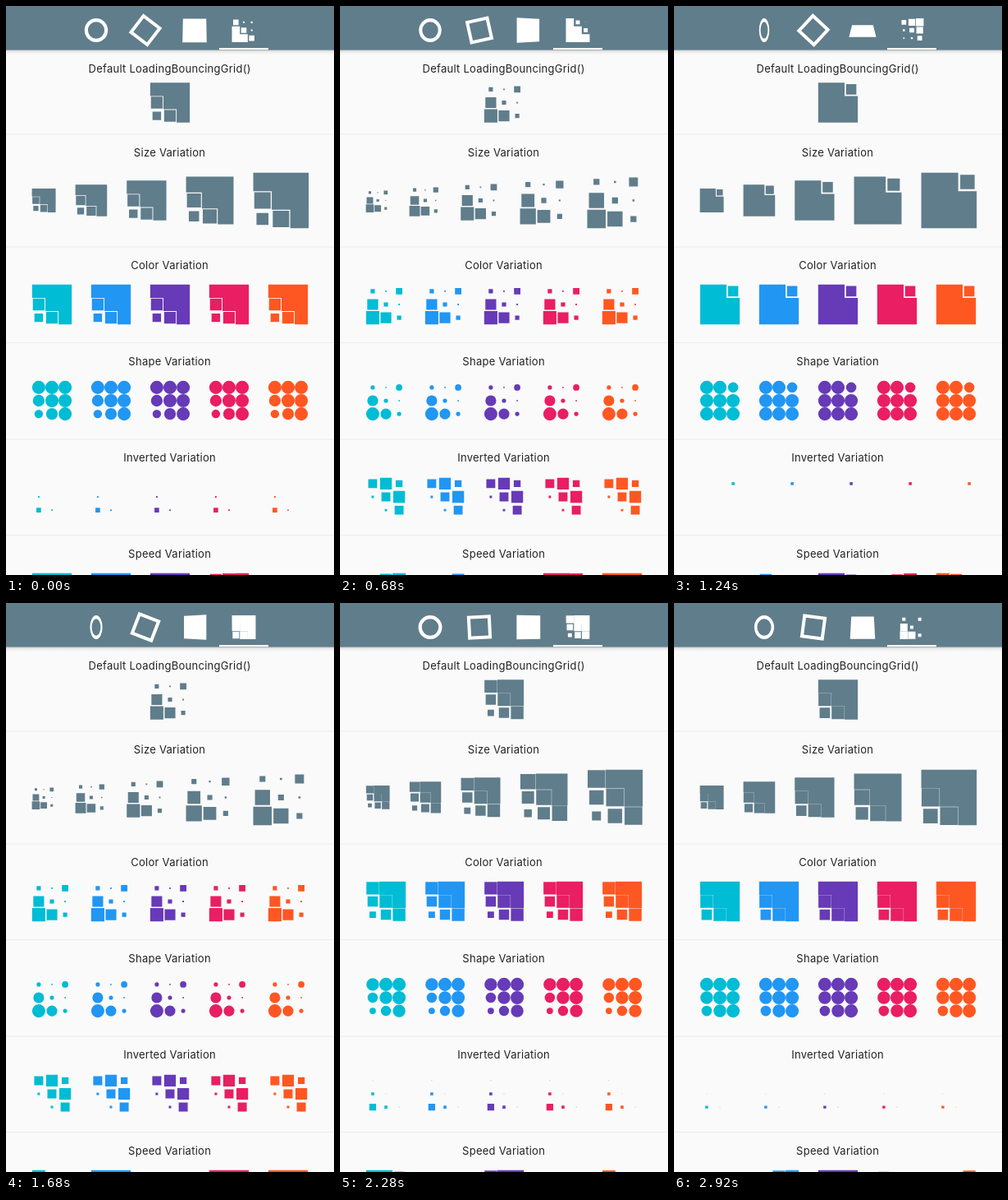
Write an HTML page that moves like this. It is 400x692 px and loops after 2960 ms.

```html
<!DOCTYPE html>
<html lang="en">
<head>
<meta charset="utf-8">
<title>Loading grids</title>
<style>
  html, body { margin: 0; width: 100%; height: 100%; overflow: hidden; background: #fafafa; }
  svg { display: block; width: 400px; height: 692px; }
  text { font: 13px Inter, Roboto, sans-serif; letter-spacing: .27px; fill: #222; text-anchor: middle; }
</style>
</head>
<body>
<svg id="stage" viewBox="0 0 400 692" xmlns="http://www.w3.org/2000/svg">
  <defs>
    <linearGradient id="shade" x1="0" y1="0" x2="0" y2="1">
      <stop offset="0" stop-color="#000" stop-opacity=".22"/>
      <stop offset=".4" stop-color="#000" stop-opacity=".07"/>
      <stop offset="1" stop-color="#000" stop-opacity="0"/>
    </linearGradient>
  </defs>
  <rect width="400" height="692" fill="#fafafa"/>
  <rect y="53" width="400" height="6" fill="url(#shade)"/>
  <rect width="400" height="53.5" fill="#607d8b"/>
  <rect x="260" y="51" width="60" height="2.2" fill="#fff"/>
  <circle id="ring" r="12.4" fill="none" stroke="#fff" stroke-width="4.2"/>
  <rect id="frame" x="-12.5" y="-12.5" width="25" height="25" fill="none" stroke="#fff" stroke-width="4"/>
  <polygon id="plate" fill="#fff"/>
</svg>
<script>
const LOOP = 2960, BEAT = 1500, UNIT = 400 / 414, ICON_Y = 29.5;
const GREY = '#607d8b';
const COLORS = ['#00bcd4', '#2196f3', '#673ab7', '#e91e63', '#ff5722'];
const stage = document.getElementById('stage');
const [ring, frame, plate] = ['ring', 'frame', 'plate'].map(id => document.getElementById(id));

function add(tag, attrs, content = '') {
  const node = document.createElementNS('http://www.w3.org/2000/svg', tag);
  for (const key in attrs) node.setAttribute(key, attrs[key]);
  node.textContent = content;
  return stage.appendChild(node);
}

function bezier(x1, y1, x2, y2) {
  const at = (a, b, s) => 3 * a * s * (1 - s) ** 2 + 3 * b * s * s * (1 - s) + s ** 3;
  return x => {
    if (x <= 0) return 0;
    if (x >= 1) return 1;
    let lo = 0, hi = 1;
    for (let i = 0; i < 22; i++) {
      const mid = (lo + hi) / 2;
      if (at(x1, x2, mid) < x) lo = mid; else hi = mid;
    }
    return at(y1, y2, lo);
  };
}
const easeIn = bezier(.42, 0, 1, 1);
const easeOut = bezier(0, 0, .58, 1);
const easeInOut = bezier(.42, 0, .58, 1);

const grids = [];
function addGrid(x, y, size, fill, options = {}) {
  const defaults = { start: 320, beat: BEAT, round: false, inverted: false };
  grids.push({ x, y, size, node: add('path', { fill }), ...defaults, ...options });
}

function addTitle(text, y) {
  add('text', { x: 199.6, y }, text);
}

function addDivider(y) {
  add('rect', { x: 0, y: y - .5, width: 400, height: 1, fill: '#eee' });
}

function addColorRow(title, y, optionsFor = () => ({})) {
  addTitle(title, y - 43.4);
  COLORS.forEach((color, i) => addGrid(56 + 72 * i, y, 50 * UNIT, color, optionsFor(i)));
}

addGrid(290, ICON_Y, 30 * UNIT, '#fff', { start: 1110 });
addTitle('Default LoadingBouncingGrid()', 81.3);
addGrid(200, 117.5, 50 * UNIT, GREY);
addTitle('Size Variation', 183.3);
let left = 31.6;
for (const size of [30, 40, 50, 60, 70]) {
  addGrid(left + size * UNIT / 2, 236.5, size * UNIT, GREY);
  left += size * UNIT + 24;
}
addColorRow('Color Variation', 363);
addColorRow('Shape Variation', 480, () => ({ round: true }));
addColorRow('Inverted Variation', 597, () => ({ inverted: true }));
addColorRow('Speed Variation', 714, i => ({ beat: 2500 - 500 * i }));
[156, 293, 409.5, 527, 643.5].forEach(addDivider);

// Goes 0 → 1 → 0, each diagonal starting a tenth of a beat after the last.
function shrinkage(progress, diagonal) {
  const x = easeIn((progress - diagonal * .1) / .6);
  return 1 - Math.abs(1 - 2 * x);
}

function cellPath(x, y, half, round) {
  const side = half * 2;
  return round
    ? `M${x - half} ${y}a${half} ${half} 0 1 1 ${side} 0a${half} ${half} 0 1 1 ${-side} 0z`
    : `M${x - half} ${y - half}h${side}v${side}h${-side}z`;
}

function drawGrid(grid, t) {
  const phase = (t + grid.start) / grid.beat % 2;
  const progress = phase > 1 ? 2 - phase : phase;
  const cell = grid.size / 3;
  let d = '';
  for (let row = -1; row <= 1; row++) {
    for (let col = -1; col <= 1; col++) {
      const shrunk = shrinkage(progress, col - row + 2);
      const scale = grid.inverted ? shrunk : 1 - shrunk;
      if (scale > .01) {
        d += cellPath(grid.x + col * cell, grid.y + row * cell, cell * scale / 2, grid.round);
      }
    }
  }
  grid.node.setAttribute('d', d);
}

// Square turned about the x axis, then the y axis, in perspective.
function platePoints(turnX, turnY) {
  const half = 15 * UNIT;
  return [[-1, -1], [1, -1], [1, 1], [-1, 1]].map(([sx, sy]) => {
    const depth = half * (sy * Math.sin(turnX) - sx * Math.sin(turnY));
    const w = 1 + .01 * depth;
    const x = 230 + sx * half * Math.cos(turnY) / w;
    const y = ICON_Y + sy * half * Math.cos(turnX) / w;
    return `${x},${y}`;
  }).join(' ');
}

function drawIcons(t) {
  const progress = (t + 620) / BEAT % 1;
  const turn = easeInOut(progress);
  ring.setAttribute('transform', `translate(110 ${ICON_Y}) scale(${Math.cos(3 * Math.PI * turn)} 1)`);
  frame.setAttribute('transform', `translate(170 ${ICON_Y}) rotate(${360 * turn})`);
  plate.setAttribute('points', platePoints(
    Math.PI * easeOut(progress * 2),
    Math.PI * easeOut(progress * 2 - 1)
  ));
}

function draw() {
  const t = performance.now() % LOOP;
  drawIcons(t);
  grids.forEach(grid => drawGrid(grid, t));
  requestAnimationFrame(draw);
}
draw();
</script>
</body>
</html>
```
